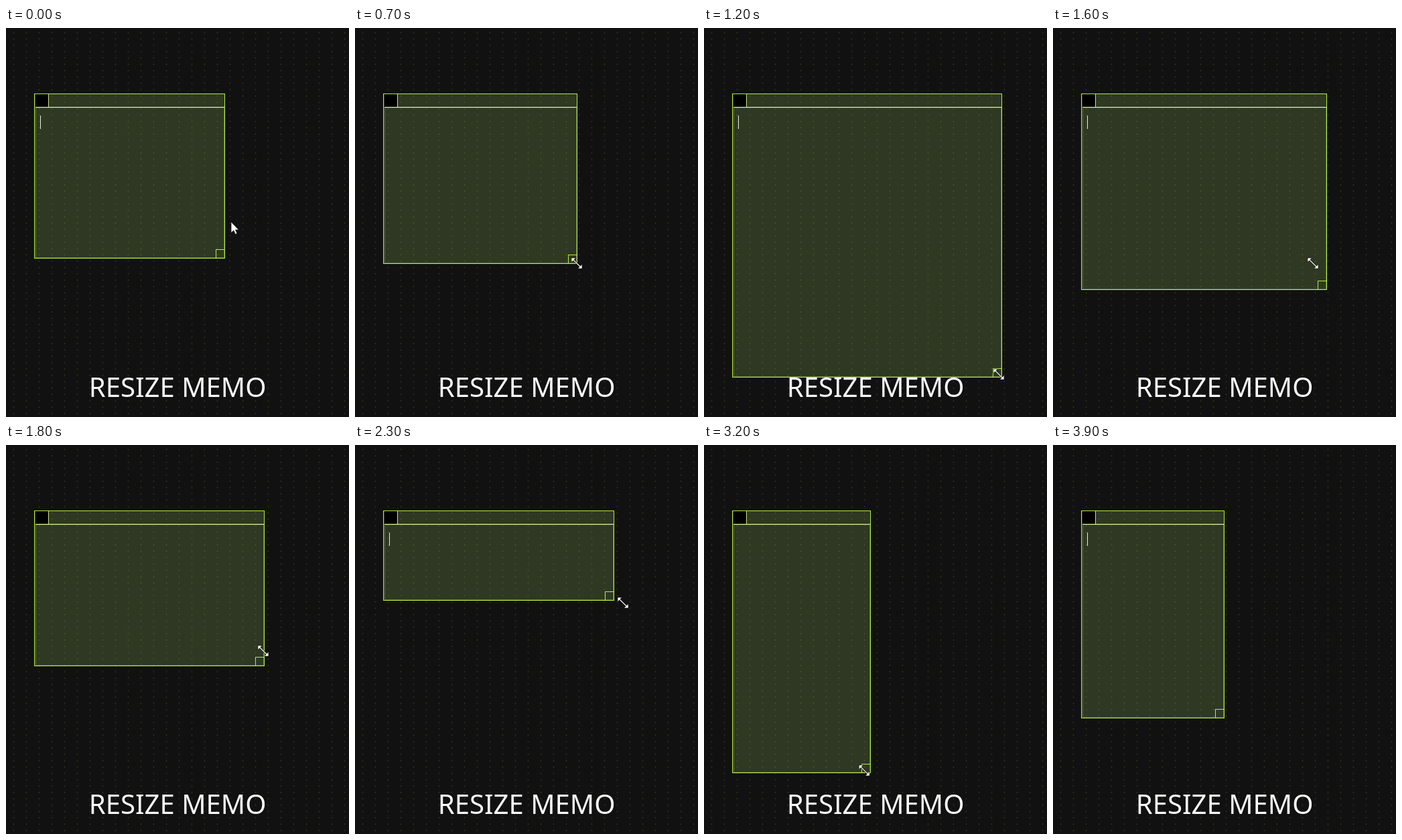
An HTML page for the animation above (4 s loop, 512x582 px).

```html
<!DOCTYPE html>
<html lang="en">
<head>
<meta charset="utf-8">
<title>Resize memo</title>
<style>
  html, body { margin: 0; width: 100%; height: 100%; overflow: hidden; background: #111; }
  svg { display: block; width: 512px; height: 582px; }
  text { font: 40.1px "Noto Sans", "Open Sans", sans-serif; fill: #fafafa; }
  .edge { fill: none; stroke: #b2ee38; }
</style>
</head>
<body>
<svg viewBox="0 0 512 582">
  <defs>
    <pattern id="dots" x="2" y="2" width="19" height="9.5" patternUnits="userSpaceOnUse">
      <circle cx="9.5" cy="4.75" r=".95" fill="#37361b"/>
    </pattern>
  </defs>
  <rect width="512" height="582" fill="#111"/>
  <rect width="512" height="582" fill="url(#dots)"/>

  <rect id="fill" x="42" y="98" fill="#afde6b" fill-opacity=".19"/>
  <rect id="inner" x="44.5" y="119.5" fill="none" stroke="#c4e08a" stroke-opacity=".3"/>
  <path id="rule" fill="none" stroke="#d8f49c"/>
  <rect x="44" y="99" width="19" height="19" fill="#000"/>
  <path d="M63.5 99V118" stroke="#c8e68c"/>
  <rect id="frame" class="edge" x="42.5" y="98.5"/>
  <rect id="grip" class="edge" width="13" height="13"/>
  <path id="caret" d="M51.5 131V151" stroke="#e6eed6"/>

  <text x="123.8" y="552">RESIZE MEMO</text>

  <path id="arrow" d="M0 0V16.5L3.8 13L6.4 18.6L9 17.4L6.5 12H11.4Z"
        fill="#fff" stroke="#111" stroke-width=".8"/>
  <g id="sizer">
    <path d="M-6 -6L6 6" stroke="#000" stroke-width="2.4"/>
    <path d="M-8 -8H-1.5L-8 -1.5ZM8 8H1.5L8 1.5Z" fill="#fff" stroke="#000" stroke-width=".6"/>
    <path d="M-6 -6L6 6" stroke="#fff" stroke-width="1.3"/>
  </g>
</svg>
<script>
const LOOP = 4000, STEP = 100, LEFT = 42, TOP = 98;
const GRAB = 500, LAG = 100; // the memo corner trails the pointer by LAG

// Pointer key points: time, x, y
const keys = [
  [0, 336, 290],
  [GRAB, 326, 344],
  [600, 331, 352],
  [700, 331, 352],
  [1100, 444, 522],
  [1200, 440, 518],
  [1500, 408, 391],
  [1600, 388, 352],
  [2200, 386, 232],
  [2300, 400, 236],
  [2500, 492, 262],
  [2700, 393, 333],
  [2800, 374, 340],
  [3100, 248, 490],
  [3600, 255, 408]
];

const $ = id => document.getElementById(id);
const set = (id, attrs) => {
  for (const k in attrs) $(id).setAttribute(k, attrs[k]);
};
const show = (id, on) => set(id, { visibility: on ? "visible" : "hidden" });
const place = (id, [x, y]) => set(id, { transform: `translate(${x} ${y})` });

function slope(i, c) {
  const a = keys[i - 1], b = keys[i + 1];
  return a && b ? (b[c] - a[c]) / (b[0] - a[0]) : 0;
}

// Smooth cubic curve through the key points
function pointer(t) {
  const next = keys.findIndex(k => k[0] > t);
  if (next < 0) return keys[keys.length - 1].slice(1);
  const i = next - 1, a = keys[i], b = keys[next], span = b[0] - a[0];
  const u = (t - a[0]) / span, v = 1 - u;
  return [1, 2].map(c =>
    v * v * (1 + 2 * u) * a[c] + u * u * (1 + 2 * v) * b[c]
    + span * u * v * (v * slope(i, c) - u * slope(next, c)));
}

function drawMemo([right, bottom]) {
  const w = right - LEFT, h = bottom - TOP;
  set("fill", { width: w + 1, height: h + 1 });
  set("frame", { width: w, height: h });
  set("inner", { width: w - 3, height: h - 22 });
  set("rule", { d: `M44 118.5H${right}` });
  set("grip", { x: right - 12.5, y: bottom - 12.5 });
}

function draw(t) {
  const spot = pointer(t), sizing = t >= GRAB - STEP;
  drawMemo(pointer(Math.max(t - LAG, GRAB)).map(Math.round));
  place("arrow", spot);
  place("sizer", spot);
  show("arrow", !sizing);
  show("sizer", sizing && t < LOOP - STEP);
  show("caret", (t + 700) % 1200 >= 600);
}

const start = performance.now();
function tick() {
  const t = (performance.now() - start) % LOOP;
  draw(Math.floor(t / STEP) * STEP);
  requestAnimationFrame(tick);
}
draw(0);
requestAnimationFrame(tick);
</script>
</body>
</html>
```
